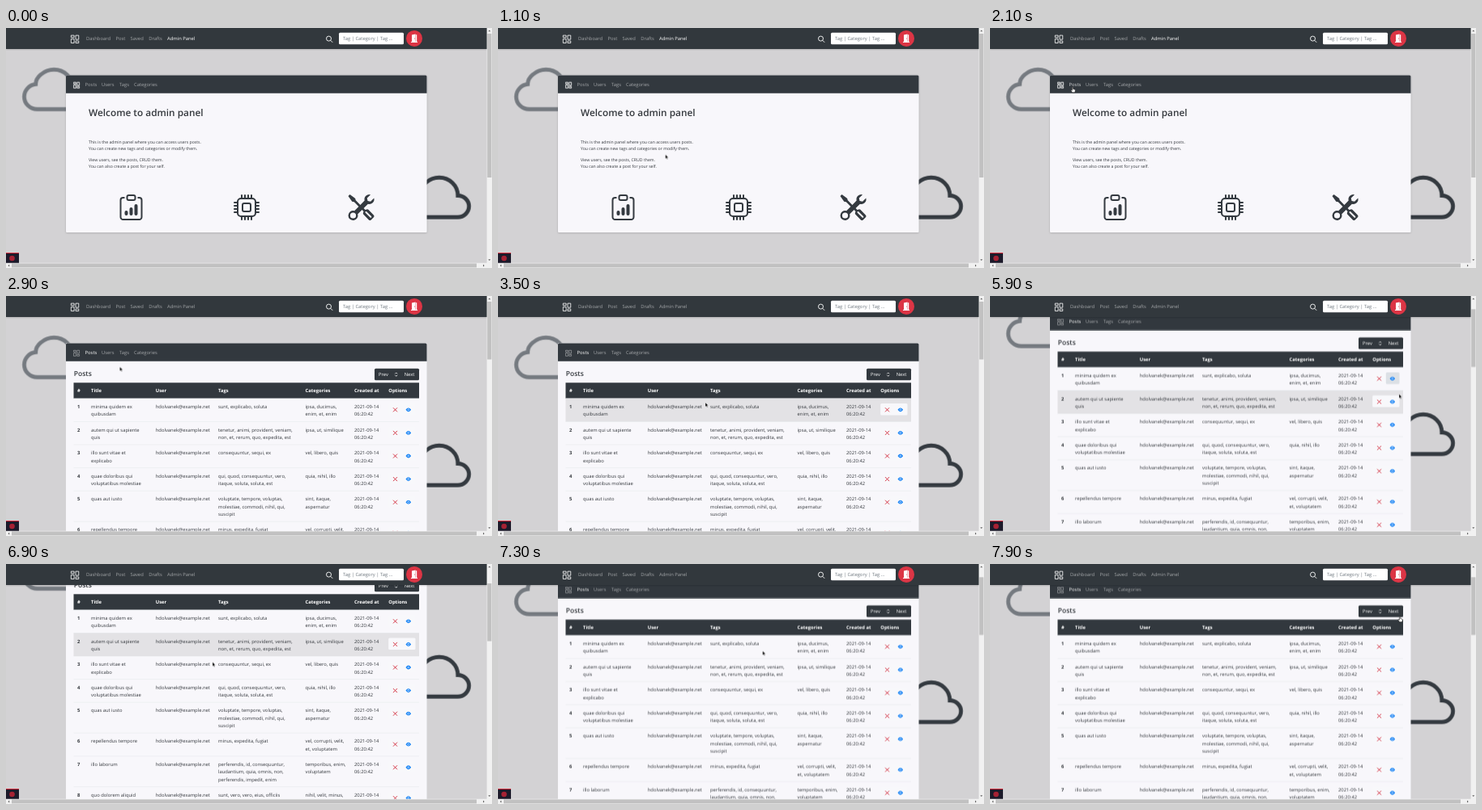
Animation, 600 px wide and 297 px high, one loop 8 s. Source, as an HTML page:

```html
<!DOCTYPE html>
<html lang="en">
<head>
<meta charset="utf-8">
<title>Admin panel</title>
<style>
html, body { margin: 0; width: 100%; height: 100%; overflow: hidden; background: #d3d2d4; }
svg { display: block; }
#stage { width: 100vw; height: 100vh; }
text { font: 5.83px "Open Sans", "Noto Sans", sans-serif; text-rendering: geometricPrecision; fill: #35393e; }
.bold { font-weight: 700; }
.nav { fill: #fff; fill-opacity: .55; }
.light { fill: #fff; }
.body { font-size: 5.17px; }
.h1 { font-size: 11.83px; font-weight: 600; }
.h2 { font-size: 8.5px; font-weight: 600; }
.hint { fill: #6c757d; }
.line { fill: none; stroke: #343a40; }
.iconLight { fill: none; stroke: #fff; }
.dark { fill: #32383e; }

/* The picture advances in 200 ms ticks; every step lands on one. */
.page, .thumb { animation: scroll 8s infinite; }
.page { --k: -1; }
.thumb { --k: .243; }
.home, .posts, .admin, .postsLink, .row1, .row2, .eyeHover, .cursor, .hand, .arrow {
  animation: 8s step-end infinite;
}
.home { animation-name: home; }
.posts { animation-name: posts; }
.admin { animation-name: admin; }
.postsLink { animation-name: postsLink; }
.row1 { animation-name: row1; }
.row2 { animation-name: row2; }
.eyeHover { animation-name: eyeHover; }
.cursor { animation-name: appear; }
.hand { animation-name: hand; }
.arrow { animation-name: arrow; }
.pointer { animation: move 8s linear infinite; }

@keyframes scroll {
  0% { transform: translateY(0px); }
  48.75% { transform: translateY(0px); animation-timing-function: steps(2, start); }
  53.75% { transform: translateY(calc(var(--k) * 38.5px)); }
  83.75% { transform: translateY(calc(var(--k) * 38.5px)); animation-timing-function: steps(2, start); }
  88.75% { transform: translateY(calc(var(--k) * 70px)); animation-timing-function: steps(2, start); }
  93.75%, 100% { transform: translateY(calc(var(--k) * 38.5px)); }
}
@keyframes move {
  0% { transform: translate(320px, 250px); }
  6.25% { transform: translate(320px, 250px); animation-timing-function: steps(6, start); }
  21.25% { transform: translate(150px, 110px); animation-timing-function: steps(3, start); }
  28.75% { transform: translate(102px, 73px); }
  36.25% { transform: translate(102px, 73px); animation-timing-function: steps(4, start); }
  46.25% { transform: translate(256px, 132px); animation-timing-function: steps(3, start); }
  53.75% { transform: translate(484px, 105px); }
  61.25% { transform: translate(484px, 105px); animation-timing-function: steps(3, start); }
  68.75% { transform: translate(497px, 102px); animation-timing-function: step-end; }
  73.75% { transform: translate(505px, 121.5px); }
  76.25% { transform: translate(505px, 121.5px); animation-timing-function: steps(3, start); }
  83.75% { transform: translate(255px, 121.5px); }
  91.25% { transform: translate(255px, 121.5px); animation-timing-function: steps(3, start); }
  98.74% { transform: translate(470px, 80px); }
  98.75%, 100% { transform: translate(506px, 65px); }
}
@keyframes home { 0% { opacity: 1; } 33.75%, 100% { opacity: 0; } }
@keyframes posts { 0% { opacity: 0; } 33.75%, 100% { opacity: 1; } }
@keyframes admin { 0% { fill-opacity: 1; } 33.75%, 100% { fill-opacity: .55; } }
@keyframes postsLink { 0% { fill-opacity: .55; } 26.25% { fill-opacity: .8; } 33.75%, 100% { fill-opacity: 1; } }
@keyframes row1 { 0% { opacity: 0; } 43.75% { opacity: 1; } 73.75%, 100% { opacity: 0; } }
@keyframes row2 { 0% { opacity: 0; } 73.75% { opacity: 1; } 91.25%, 100% { opacity: 0; } }
@keyframes eyeHover { 0% { opacity: 0; } 66.25% { opacity: 1; } 76.25%, 100% { opacity: 0; } }
@keyframes appear { 0% { opacity: 0; } 6.25%, 100% { opacity: 1; } }
@keyframes hand {
  0% { opacity: 0; } 26.25% { opacity: 1; } 36.25% { opacity: 0; }
  51.25% { opacity: 1; } 73.75% { opacity: 0; } 98.75%, 100% { opacity: 1; }
}
@keyframes arrow {
  0% { opacity: 1; } 26.25% { opacity: 0; } 36.25% { opacity: 1; }
  51.25% { opacity: 0; } 73.75% { opacity: 1; } 98.75%, 100% { opacity: 0; }
}
</style>
</head>
<body>
<svg id="stage" viewBox="0 0 600 297">
  <defs>
    <path id="cloud" fill="none" d="M3.78 12.5H12.69C14.2 12.5 15.5 11.3 15.5 9.77S14.2 7.04 12.69 7.04C12.69 4.5 10.6 2.5 8 2.5A5 5 0 0 0 4.73 3.72C3.9 4.4 3.4 5.4 3.4 6.18C1.8 6.35 .5 7.7 .5 9.32C.5 11.1 1.97 12.5 3.78 12.5z"/>
    <path id="grid" d="M.5 .5h6v4h-6zM.5 7.5h6v8h-6zM9.5 .5h6v8h-6zM9.5 11.5h6v4h-6z"/>
    <path id="cross" fill="none" stroke="#d32f40" stroke-width=".95" d="M-2.5-2.5l5 5M2.5-2.5l-5 5"/>
    <g id="eye">
      <path fill="#0a7cf5" d="M-3.3 0Q0-4.8 3.3 0Q0 4.8-3.3 0z"/>
      <circle r="1.35" fill="#f8f9fa"/>
      <circle r=".85" fill="#0a7cf5"/>
    </g>
    <filter id="shadow" x="-5%" y="-5%" width="110%" height="110%">
      <feDropShadow dx="0" dy=".6" stdDeviation="1" flood-opacity=".2"/>
    </filter>
  </defs>

  <rect width="600" height="297" fill="#d3d2d4"/>

  <g class="page">
    <use href="#cloud" stroke="#757a80" transform="translate(20 39.2) scale(4.9)"/>
    <use href="#cloud" stroke="#343a40" transform="translate(495.6 172.8) scale(4.9)"/>

    <g class="home">
      <rect x="74" y="58.5" width="445.5" height="194.5" rx="1.5" fill="#f8f7fb" filter="url(#shadow)"/>
      <text class="h1" x="102" y="108.6">Welcome to admin panel</text>
      <text class="body" x="102" y="142.7">This is the admin panel where you can access users posts.</text>
      <text class="body" x="102" y="150.9">You can create new tags and categories or modify them.</text>
      <text class="body" x="102" y="165">View users, see the posts, CRUD them.</text>
      <text class="body" x="102" y="173.2">You can also create a post for your self.</text>

      <g class="line" transform="translate(138.5 206) scale(2)">
        <path d="M4 2H3a1.5 1.5 0 0 0-1.5 1.5V14A1.5 1.5 0 0 0 3 15.5h10a1.5 1.5 0 0 0 1.5-1.5V3.5A1.5 1.5 0 0 0 13 2h-1"/>
        <rect x="5.5" y=".5" width="5" height="3" rx="1"/>
        <path stroke-width="2" stroke-linecap="round" d="M5 11v1M8 9v3M11 7v5"/>
      </g>
      <g class="line" transform="translate(281 206) scale(2)">
        <rect x="2.5" y="2.5" width="11" height="11" rx="2"/>
        <rect x="5.5" y="5.5" width="5" height="5" rx="1"/>
        <path id="pins" stroke-linecap="round" d="M5 .5v2M7 .5v2M9 .5v2M11 .5v2M5 13.5v2M7 13.5v2M9 13.5v2M11 13.5v2"/>
        <use href="#pins" transform="rotate(90 8 8)"/>
      </g>
      <g transform="translate(422.5 206) scale(2)">
        <path fill="#343a40" fill-rule="evenodd" d="M1 0 0 1l2.2 3.08a1 1 0 0 0 .815.42h.07a1 1 0 0 1 .708.293l2.675 2.675-2.617 2.654A3 3 0 0 0 0 13a3 3 0 1 0 5.878-.851l2.654-2.617.968.968-.305.914a1 1 0 0 0 .242 1.023l3.27 3.27a1 1 0 0 0 1.414 0l1.586-1.586a1 1 0 0 0 0-1.414l-3.27-3.27a1 1 0 0 0-1.023-.242L10.5 9.5l-.96-.96 2.68-2.643A3 3 0 0 0 15.9 2.22l-2.14 2.14L12 4l-.364-1.757L13.777.1a3 3 0 0 0-3.675 3.68L7.462 6.46 4.793 3.793a1 1 0 0 1-.293-.707v-.071a1 1 0 0 0-.419-.814z"/>
        <path stroke="#f8f7fb" stroke-linecap="round" d="M11 11l2.9 2.9"/>
        <circle cx="3" cy="13" r="1.8" fill="#f8f7fb"/>
      </g>
    </g>

    <g class="posts">
      <rect x="74" y="58.5" width="445.5" height="400" fill="#f8f7fb"/>
      <text class="h2" x="83.8" y="98.8">Posts</text>
      <rect class="dark" x="455" y="89.8" width="55" height="14.4" rx="1.5"/>
      <text class="light" x="460" y="99.2">Prev</text>
      <path fill="none" stroke="#fff" stroke-width=".8" d="M480.3 96.3l1.4-1.4 1.4 1.4M480.3 97.9l1.4 1.4 1.4-1.4"/>
      <text class="light" x="491.7" y="99.2">Next</text>
      <rect class="dark" x="83.5" y="107.3" width="426.5" height="19.4"/>
      <g id="table"></g>
    </g>

    <path class="dark" d="M74 80.7V60a1.5 1.5 0 0 1 1.5-1.5H518a1.5 1.5 0 0 1 1.5 1.5V80.7z"/>
    <g class="iconLight" transform="translate(83.3 67) scale(.47)">
      <use href="#grid" stroke-width="1.4" opacity=".55"/>
      <use class="home" href="#grid" stroke-width="1.4"/>
    </g>
    <g id="panelNav"></g>
  </g>

  <rect width="594" height="26" class="dark" filter="url(#shadow)"/>
  <use href="#grid" class="iconLight" stroke-width="1.3" transform="translate(80 8.8) scale(.63)"/>
  <g id="topNav"></g>
  <g class="iconLight" stroke-width=".9">
    <circle cx="398.5" cy="13.1" r="3"/>
    <path d="M400.7 15.3l2.5 2.5"/>
  </g>
  <rect x="411" y="5.8" width="80" height="14.4" rx="1.5" fill="#fff"/>
  <text class="hint" x="416" y="15.2">Tag | Category | Tag ...</text>
  <circle cx="504" cy="12.9" r="10" fill="#dc3545"/>
  <path fill="#fff" d="M501 8.4l4.6-.8v9.6H501zM506 8.2h1.2v9H506zM500 17h8v.9h-8z"/>
  <circle cx="504.4" cy="12.9" r=".5" fill="#dc3545"/>

  <rect y="278" width="16" height="13" fill="#1c1a2a"/>
  <rect y="278" width="16" height="1" fill="#d5283a"/>
  <circle cx="7.5" cy="285" r="3.3" fill="#a62234"/>

  <path fill="#f1f1f1" d="M593.6 0H600V297H0V290.8H593.6z"/>
  <g fill="#c1c1c1">
    <rect class="home" x="594.2" y="7" width="5.2" height="178"/>
    <g class="posts"><rect class="thumb" x="594.2" y="7" width="5.2" height="71.5"/></g>
    <rect x="7" y="291.4" width="574" height="5"/>
  </g>
  <path fill="#606060" d="M595.3 4.2h3l-1.5-1.7zM595.3 286.3h3l-1.5 1.7zM4.2 292.5v3l-1.7-1.5zM589 292.5v3l1.7-1.5z"/>

  <g class="cursor"><g class="pointer">
    <path class="arrow" fill="#111" stroke="#fff" stroke-width=".25" d="M0 0v5l1.2-1.1.8 1.8.8-.4-.8-1.7h1.6z"/>
    <path class="hand" fill="#fff" stroke="#111" stroke-width=".55" stroke-linejoin="round" d="M-.6.4Q0-.4.6.4V2.6l2 .5q.8.3.7 1.2L2.8 6.8H-.5L-2 4.3q-.2-.9.6-.7l.8.7z"/>
  </g></g>
</svg>

<script>
const byId = id => document.getElementById(id);
const label = (x, y, str, cls = "") => `<text class="${cls}" x="${x}" y="${y}">${str}</text>`;
const nav = (y, items) => items.map(([x, str, cls = ""]) => label(x, y, str, "nav " + cls)).join("");

byId("topNav").innerHTML = nav(15.2, [
  [99, "Dashboard"], [135.5, "Post"], [153.5, "Saved"], [176.3, "Drafts"], [199, "Admin Panel", "admin"]
]);
byId("panelNav").innerHTML = nav(72.1, [
  [97.6, "Posts", "postsLink"], [118, "Users"], [140, "Tags"], [158, "Categories"]
]);

const columns = [88, 105, 184.8, 262, 369.6, 430, 472.3];
const heads = ["#", "Title", "User", "Tags", "Categories", "Created at", "Options"];
const user = "hdolvanek@example.net";
const created = "2021-09-14/06:20:42";
const LINE = 9.35;

// Title, tags and categories; "/" breaks a line.
const posts = [
  ["minima quidem ex/quibusdam", "sunt, explicabo, soluta", "ipsa, ducimus,/enim, et, enim"],
  ["autem qui ut sapiente/quis", "tenetur, animi, provident, veniam,/non, et, rerum, quo, expedita, est", "ipsa, ut, similique"],
  ["illo sunt vitae et/explicabo", "consequuntur, sequi, ex", "vel, libero, quis"],
  ["quae doloribus qui/voluptatibus molestiae", "qui, quod, consequuntur, vero,/itaque, soluta, soluta, est", "quia, nihil, illo"],
  ["quas aut iusto", "voluptate, tempore, voluptas,/molestiae, commodi, nihil, qui,/suscipit", "sint, itaque,/aspernatur"],
  ["repellendus tempore", "minus, expedita, fugiat", "vel, corrupti, velit,/et, voluptatem"],
  ["illo laborum", "perferendis, id, consequuntur,/laudantium, quia, omnis, non,/perferendis, impedit, enim", "temporibus, enim,/voluptatem"],
  ["quo dolorem aliquid", "sunt, vero, vero, eius, officiis", "nihil, velit, minus,"]
];

let top_ = 126.8;
let html = heads.map((head, i) => label(columns[i], 119.2, head, "bold light")).join("");
posts.forEach(([title, tags, categories], i) => {
  const cells = [String(i + 1), title, user, tags, categories, created].map(cell => cell.split("/"));
  const height = 9.9 + LINE * Math.max(...cells.map(lines => lines.length));
  const hover = i < 2
    ? `<rect class="row${i + 1}" x="83.5" y="${top_}" width="426.5" height="${height}" fill="#e3e2e5"/>` : "";
  const eyeHover = i === 0
    ? `<rect class="eyeHover" x="488.8" y="${top_ + 6.2}" width="16.7" height="14.4" rx="1.5" fill="#dce0e5"/>` : "";
  html += `${hover}<path stroke="#dee2e6" stroke-width=".4" d="M83.5 ${top_}h426.5"/>
    <rect x="472.2" y="${top_ + 6.2}" width="33.3" height="14.4" rx="1.5" fill="#f8f8fb"/>${eyeHover}
    <use href="#cross" x="480.5" y="${top_ + 14}"/><use href="#eye" x="496.8" y="${top_ + 14}"/>`;
  cells.forEach((lines, col) => lines.forEach((str, n) => {
    html += label(columns[col], top_ + 12.2 + n * LINE, str, col ? "" : "bold");
  }));
  top_ += height;
});
byId("table").innerHTML = html;
</script>
</body>
</html>
```
